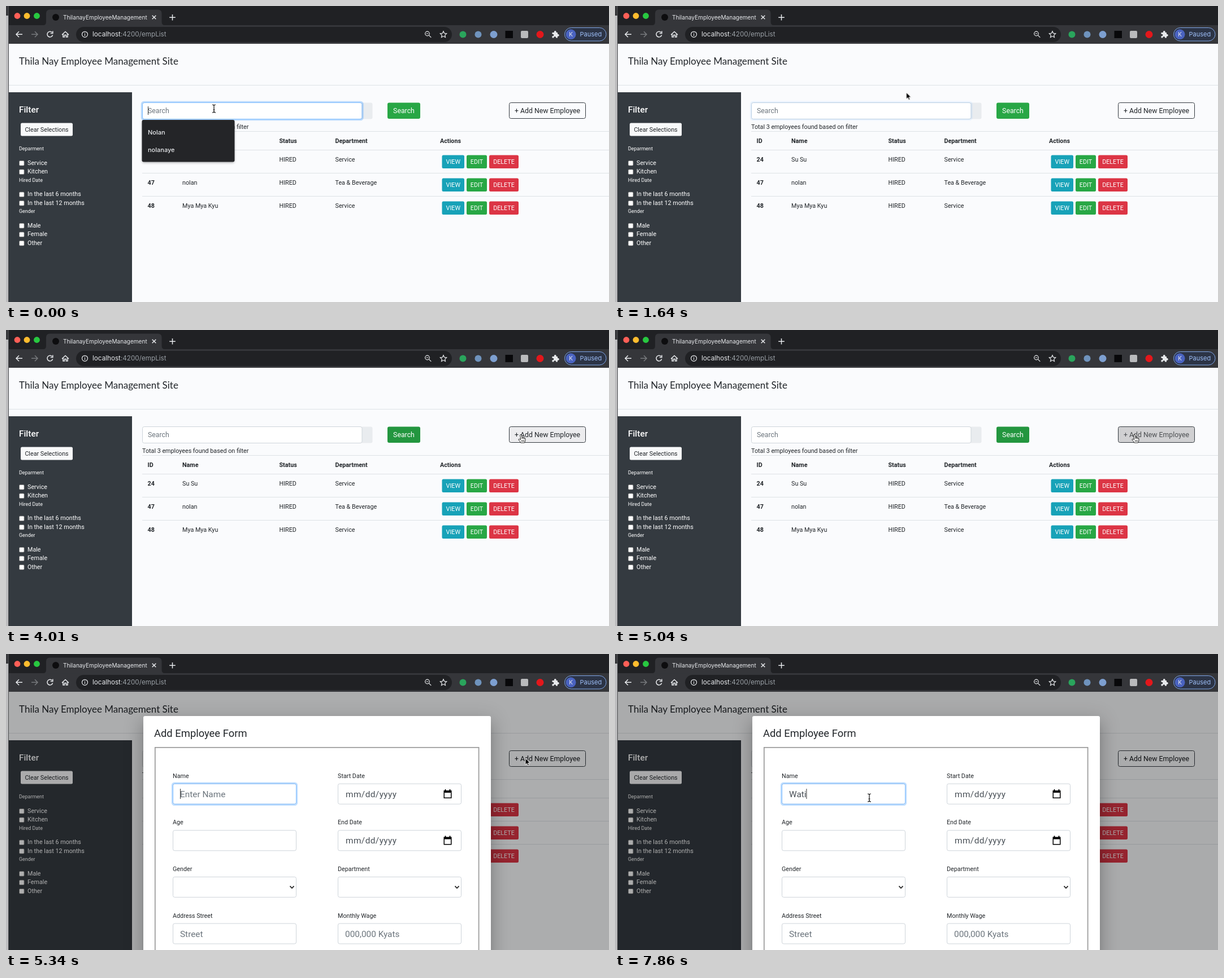
These frames come from a looping animation (1067 by 525 pixels, 8 s). An HTML page:

```html
<!DOCTYPE html>
<html lang="en">
<head>
<meta charset="utf-8">
<title>Employee list</title>
<style>
html, body { margin: 0; width: 100%; height: 100%; overflow: hidden; background: #fafbfd; }
svg { display: block; width: 1067px; height: 525px; }
text { font: 10.75px Roboto, sans-serif; fill: #212529; white-space: pre; }
.base { font-size: 12.3px; }
.big { font-size: 15.36px; }
.title { font-size: 18.4px; }
.bold { font-weight: 700; }
.hint { fill: #6c757d; }
.mid { text-anchor: middle; }
.white { fill: #fff; }
.tiny { font-size: 8.95px; }
.brand { font: 17px Lato, sans-serif; }
.ui { font: 11px Inter, sans-serif; fill: #e8eaed; }
.item { font-weight: 500; }
.line { fill: none; stroke: #e8eaed; stroke-width: 1.5; }
.box { fill: #fff; stroke: #ced4da; }
.ring { fill: none; stroke: #007bff; stroke-opacity: .25; stroke-width: 2.4; }
.edge { fill: none; stroke: #80bdff; }
.rule { stroke: #dee2e6; }
.cell { fill: none; stroke: #999; stroke-width: 1.7; }
.shadow1 { filter: blur(6px); opacity: .2; }
.shadow2 { filter: blur(14px); opacity: .14; }
.shadow3 { filter: blur(17px); opacity: .12; }

.anim, .anim * { animation: 8s step-end infinite; }
#cursor { animation-name: move; }
#beam { animation-name: beam; }
#arrow { animation-name: arrow; }
#hand { animation-name: hand; }
#searchFocus { animation-name: searchFocus; }
#searchCaret { animation-name: searchCaret; }
#history { animation-name: history; }
#searchBtn { animation-name: searchBtn; }
#addBtn { animation-name: addBtn; }
#addText { animation-name: addText; }
#backdrop { animation-name: backdrop; }
#modal { animation-name: modal; transform-origin: 550.5px 345px; }
#nameFocus { animation-name: nameFocus; }
#nameCaret { animation-name: nameCaret; }
#nameHint { animation-name: nameHint; }
#autofill { animation-name: autofill; }
#typed tspan { visibility: hidden; }
#typed tspan:nth-child(1) { animation-name: key1; }
#typed tspan:nth-child(2) { animation-name: key2; }
#typed tspan:nth-child(3) { animation-name: key3; }
#typed tspan:nth-child(4) { animation-name: key4; }

@keyframes move {
  0% { transform: translate(368px, 182px); }
  1.875% { transform: translate(371px, 184px); }
  3.75% { transform: translate(375px, 188px); }
  5.625% { transform: translate(378px, 190px); }
  9.375% { transform: translate(390px, 189px); }
  11.25% { transform: translate(414px, 184px); }
  13.125% { transform: translate(445px, 176px); }
  14.875% { transform: translate(475px, 167px); }
  16.75% { transform: translate(500px, 158px); }
  18.625% { transform: translate(513px, 154px); }
  20.5% { transform: translate(515.5px, 153.5px); }
  24.25% { transform: translate(681px, 162px); }
  28% { transform: translate(688px, 178px); }
  29.875% { transform: translate(690px, 185px); }
  31.75% { transform: translate(690px, 188px); }
  39.125% { transform: translate(702px, 189px); }
  41% { transform: translate(736px, 191px); }
  42.875% { transform: translate(780px, 191px); }
  44.625% { transform: translate(825px, 190px); }
  46.5% { transform: translate(865px, 188px); }
  48.375% { transform: translate(896px, 187px); }
  50.125% { transform: translate(911px, 185px); }
  53.75% { transform: translate(915px, 185px); }
  55.625% { transform: translate(919px, 185px); }
  68.625% { transform: translate(880px, 192px); }
  70.5% { transform: translate(720px, 212px); }
  72.375% { transform: translate(548px, 242px); }
  74.25% { transform: translate(450px, 255px); }
}
@keyframes beam { 0% { opacity: 1; } 14.875% { opacity: 0; } 74.25% { opacity: 1; } }
@keyframes arrow {
  0% { opacity: 0; } 14.875% { opacity: 1; } 28% { opacity: 0; } 41% { opacity: 1; }
  48.375% { opacity: 0; } 63.125% { opacity: 1; } 74.25% { opacity: 0; }
}
@keyframes hand {
  0% { opacity: 0; } 28% { opacity: 1; } 41% { opacity: 0; }
  48.375% { opacity: 1; } 63.125% { opacity: 0; }
}
@keyframes searchFocus { 0% { opacity: 1; } 18.625% { opacity: .7; } 20.5% { opacity: .25; } 22.375% { opacity: 0; } }
@keyframes searchCaret { 0% { opacity: 1; } 3.75% { opacity: 0; } 11.25% { opacity: 1; } 16.75% { opacity: 0; } }
@keyframes history { 0% { opacity: 1; } 18.625% { opacity: 0; } }
@keyframes searchBtn {
  0% { fill: #28a745; } 28% { fill: #249540; } 29.875% { fill: #218838; }
  31.75% { fill: #1e7e34; } 33.5% { fill: #218838; } 41% { fill: #23963f; }
}
@keyframes addBtn {
  0% { fill: #fafbfd; } 48.375% { fill: #f2f2f4; } 50.125% { fill: #ececee; }
  61.25% { fill: #d0d0d2; } 66.75% { fill: #fafbfd; }
}
@keyframes addText { 0% { fill: #212529; } 61.25% { fill: #4c4f52; } 66.75% { fill: #16191c; } }
@keyframes backdrop { 0% { opacity: 0; } 63.125% { opacity: .04; } 64.875% { opacity: .21; } 66.75% { opacity: .315; } 68.625% { opacity: .32; } }
@keyframes modal {
  0% { opacity: 0; transform: scale(.7); }
  64.875% { opacity: .98; transform: scale(.99); }
  66.75% { opacity: 1; transform: none; }
}
@keyframes nameFocus { 0% { opacity: 0; } 66.75% { opacity: 1; } }
@keyframes nameCaret {
  0% { opacity: 0; transform: none; }
  66.75% { opacity: 1; transform: none; }
  72.375% { opacity: 0; transform: none; }
  77.875% { opacity: 1; transform: none; }
  83.375% { opacity: 0; transform: none; }
  89% { opacity: 1; transform: translate(13.5px, 0); }
  90.875% { opacity: 1; transform: translate(21.7px, 0); }
  94.625% { opacity: 1; transform: translate(26.7px, 0); }
  98.25% { opacity: 1; transform: translate(30.4px, 0); }
}
@keyframes nameHint { 0% { opacity: 1; } 89% { opacity: 0; } }
@keyframes autofill { 0% { opacity: 0; } 79.75% { opacity: 1; } 89% { opacity: 0; } }
@keyframes key1 { 0% { visibility: hidden; } 89% { visibility: visible; } }
@keyframes key2 { 0% { visibility: hidden; } 90.875% { visibility: visible; } }
@keyframes key3 { 0% { visibility: hidden; } 94.625% { visibility: visible; } }
@keyframes key4 { 0% { visibility: hidden; } 98.25% { visibility: visible; } }
</style>
</head>
<body>
<svg viewBox="0 0 1067 525" class="anim">
  <rect width="1067" height="525" fill="#fafbfd"/>

  <!-- page -->
  <text class="brand" x="23" y="103.5">Thila Nay Employee Management Site</text>
  <path class="rule" d="M5 140.5H1067"/>
  <rect x="5" y="153" width="218" height="372" fill="#343a40"/>
  <text class="big white" x="23" y="188.6" font-weight="500" style="font-weight:500">Filter</text>
  <rect x="26" y="207.5" width="92" height="23" rx="2.5" fill="#f8f9fa"/>
  <text class="mid" x="72" y="222.9">Clear Selections</text>
  <g id="filters"></g>

  <rect x="628" y="171.5" width="20.5" height="29" rx="3" fill="#e9ecef"/>
  <rect class="box" x="241.5" y="171.5" width="388.5" height="29" rx="3"/>
  <g id="searchFocus">
    <rect class="ring" x="240" y="170" width="391.5" height="32" rx="4"/>
    <rect class="edge" x="241.5" y="171.5" width="388.5" height="29" rx="3"/>
  </g>
  <text class="base hint" x="251" y="189.6">Search</text>
  <path id="searchCaret" d="M251.5 178V193" stroke="#333"/>
  <rect id="searchBtn" x="675" y="171.5" width="58" height="28.5" rx="3"/>
  <text class="base mid white" x="704" y="189.6">Search</text>
  <rect id="addBtn" x="890.5" y="171.5" width="135" height="28" rx="3" stroke="#343a40"/>
  <text id="addText" class="base mid" x="958" y="189.6">+ Add New Employee</text>
  <text x="241" y="217.8">Total 3 employees found based on filter</text>
  <g id="table"></g>

  <g id="history">
    <rect x="241" y="205" width="163" height="73" rx="3" style="filter:blur(2px)" opacity=".3"/>
    <rect x="240.5" y="202" width="164" height="74.5" rx="3" fill="#242528"/>
    <text class="ui item" x="251" y="228">Nolan</text>
    <text class="ui item" x="251" y="258.5">nolanaye</text>
  </g>

  <!-- dialog -->
  <rect id="backdrop" x="5" y="67" width="1062" height="458"/>
  <g id="modal">
    <rect class="shadow1" x="248" y="124" width="605" height="460"/>
    <rect class="shadow2" x="241" y="126" width="619" height="475"/>
    <rect class="shadow3" x="237" y="111" width="627" height="482"/>
    <rect x="243" y="110" width="615" height="470" rx="3" fill="#fff"/>
    <text class="title" x="262" y="147">Add Employee Form</text>
    <rect class="cell" x="263.8" y="165.8" width="572.8" height="400"/>
    <g id="fields"></g>
    <g id="nameFocus">
      <rect class="ring" x="294" y="228.7" width="221" height="39" rx="4"/>
      <rect class="edge" x="295.5" y="230.2" width="218" height="36" rx="3"/>
    </g>
    <text id="nameHint" class="big hint" x="308" y="253.6">Enter Name</text>
    <text id="typed" class="big" x="308" y="253.6" style="fill:#495057"><tspan>W</tspan><tspan>a</tspan><tspan>t</tspan><tspan>i</tspan></text>
    <path id="nameCaret" d="M308.5 239V257" stroke="#333"/>
    <g id="autofill">
      <rect x="295" y="271" width="219" height="147" rx="3" style="filter:blur(2px)" opacity=".35"/>
      <rect x="294.5" y="268" width="219.5" height="148" rx="3" fill="#292a2d"/>
      <path d="M294.5 381.5H514" stroke="#3f4145"/>
      <text class="ui item" x="305" y="294.8">Khin Maw Aye</text>
      <text class="ui" x="305" y="312.6" style="font-size:10px">283 Doval St</text>
      <text class="ui item" x="305" y="343.9">Nolan Aye</text>
      <text class="ui" x="305" y="361.6" style="font-size:10px">2715 W Torv St</text>
      <text class="ui item" x="305" y="402.9" style="font-size:10.8px">Manage addresses...</text>
    </g>
  </g>

  <!-- browser window -->
  <rect width="4" height="525" fill="#bdbdbf"/>
  <rect width="4" height="17" fill="#3a3b3e"/>
  <path d="M4.5 0V525" stroke="#4b4c4f"/>
  <rect x="5" width="1062" height="35" fill="#202124"/>
  <rect x="5" y="34" width="1062" height="33" fill="#35363a"/>
  <circle cx="20" cy="17.5" r="5.4" fill="#ff5f57"/>
  <circle cx="37" cy="17.5" r="5.4" fill="#febc2e"/>
  <circle cx="54.5" cy="17.5" r="5.4" fill="#28c840"/>
  <path d="M65 34.5Q71 34.5 71 28V13Q71 6.5 77.500 6.5H269Q275.500 6.500 275.500 13V28Q275.500 34.500 282 34.500Z" fill="#35363a"/>
  <circle cx="88" cy="20" r="6" fill="#0d0d0f"/>
  <text class="ui" x="101" y="23.800" style="font-size:10.05px">ThilanayEmployeeManagement</text>
  <path class="line" d="M258.700 16.700l6.600 6.600m0-6.600l-6.600 6.600M294.500 15V25.500M289.200 20.200H299.800"/>
  <path class="line" d="M29 50.300H18.500M23 45.300l-5 5 5 5"/>
  <path class="line" style="stroke:#77797d" d="M45 50.300H55.500M51 45.300l5 5-5 5"/>
  <path class="line" d="M81.500 46.800A4.900 4.900 0 1 0 82.600 51.500M82.800 44.500V48.500H78.800"/>
  <path class="line" d="M99 51l6-5.500 6 5.500M101 49.500V55H103.500V51.500H106.500V55H109V49.500"/>
  <rect x="124" y="37" width="665" height="27" rx="13.500" fill="#202124"/>
  <g class="line" style="stroke-width:1.200">
    <circle cx="139.500" cy="50.300" r="5"/>
    <path d="M139.500 49.500V53M139.500 47.200V48.400"/>
    <circle cx="745.500" cy="49" r="3.800"/>
    <path d="M748.300 51.800l4 4M743.700 49H747.300"/>
    <path d="M774 44.700l1.700 3.700 4 .5-3 2.700.8 4-3.500-2-3.500 2 .8-4-3-2.700 4-.5z"/>
  </g>
  <text class="ui" x="153" y="54.400" style="font-size:11.700px">localhost<tspan fill="#9aa0a6">:4200/empList</tspan></text>
  <circle cx="808.500" cy="50.500" r="6" fill="#2aa55c"/>
  <circle cx="835.500" cy="50.500" r="6" fill="#6f93bd"/>
  <circle cx="863" cy="50.500" r="6.500" fill="#7d9fd0"/>
  <rect x="883.500" y="44" width="13.500" height="13" fill="#08080a"/>
  <rect x="911" y="44" width="13" height="13" rx="2" fill="#b9babc"/>
  <circle cx="945" cy="50.500" r="6.500" fill="#e3171b"/>
  <path d="M966.500 47H970A2 2 0 1 1 973.500 47H976V50A2 2 0 1 1 976 53.700V56.500H973A1.800 1.800 0 1 0 969.500 56.500H966.500V53A1.800 1.800 0 1 0 966.500 50Z" fill="#e8eaed"/>
  <rect x="988.500" y="38.500" width="73.500" height="23.500" rx="11.750" fill="#2c3446" stroke="#7fa6e8"/>
  <circle cx="999.500" cy="50.300" r="9" fill="#4a63c0"/>
  <text class="ui mid" x="999.500" y="54" style="font-size:10px">K</text>
  <text class="ui" x="1015.500" y="54.300" style="fill:#9fc0fa">Paused</text>

  <g id="cursor">
    <path id="beam" d="M-3 -7Q0 -7 0 -5Q0 -7 3 -7M0 -5V5M-3 7Q0 7 0 5Q0 7 3 7M-1.500 2H1.500" fill="none" stroke="#111" stroke-width="1.200"/>
    <path id="arrow" d="M0 0V11.500L2.700 9 4.500 13.200 6.500 12.300 4.700 8.200H8.400Z" fill="#000" stroke="#fff" stroke-width=".9"/>
    <path id="hand" d="M-1.300 1Q0 -.5 1.200 1L2 5.300Q3.300 4.300 4 5.600 5.400 5 6 6.400 7.800 6 7.900 7.800V11L6.500 15H-.2Q-1 12.500 -3.800 10.200-4.500 8.500-2.700 8.300L-.3 9.500Z M2 5.300V8M4 5.600V8.300M6 6.400V8.600M1.500 10.500V13M3.500 10.500V13M5.300 10.500V13" fill="#fff" stroke="#111" stroke-width=".9"/>
  </g>
</svg>

<script>
const put = (id, html) => document.getElementById(id).innerHTML = html;
const text = (x, y, label, cls = '') => `<text x="${x}" y="${y}" class="${cls}">${label}</text>`;

const heads = [['Deparment', 256.2], ['Hired Date', 311.7], ['Gender', 367.2]];
const checks = [['Service', 278], ['Kitchen', 293.5], ['In the last 6 months', 333.5],
  ['In the last 12 months', 349], ['Male', 389], ['Female', 404.5], ['Other', 420]];
put('filters',
  heads.map(([label, y]) => text(23, y, label, 'tiny white')).join('') +
  checks.map(([label, y]) =>
    `<rect x="23.5" y="${y - 3.5}" width="8.6" height="8.6" rx="1.5" fill="#fff" stroke="#767676" stroke-width=".8"/>` +
    text(38, y + 3.9, label, 'white')).join(''));

const columns = [250.5, 312, 483.5, 582.5, 768];
const people = [['24', 'Su Su', 'HIRED', 'Service'], ['47', 'nolan', 'HIRED', 'Tea &amp; Beverage'],
  ['48', 'Mya Mya Kyu', 'HIRED', 'Service']];
const actions = [['VIEW', 771.5, 39.5, '#17a2b8'], ['EDIT', 815, 36, '#28a745'], ['DELETE', 855, 52, '#dc3545']];
const button = (y, [label, x, w, color]) =>
  `<rect x="${x}" y="${y}" width="${w}" height="23.5" rx="2.5" fill="${color}"/>` +
  text(x + w / 2, y + 15.6, label, 'mid white');
put('table',
  '<path class="rule" d="M241 222.5H1067M241 255.5H1067M241 296.500H1067M241 337.500H1067"/>' +
  ['ID', 'Name', 'Status', 'Department', 'Actions'].map((h, i) => text(columns[i], 242.8, h, 'bold')).join('') +
  people.map((row, r) =>
    row.map((v, i) => text(columns[i], 275.9 + 41 * r, v, i ? '' : 'bold')).join('') +
    actions.map(a => button(264.5 + 41 * r, a)).join('')).join(''));

const calendar = y => `<path transform="translate(781.5 ${y})" fill-rule="evenodd"
  d="M-7 -6H-5V-8H-3V-6H3V-8H5V-6H7V8H-7ZM-5.500 -2V6.500H5.500V-2Z"/>`;
const chevron = (x, y) => `<path d="M${x - 3.500} ${y - 2}l3.500 3.700 3.500-3.700" fill="none" stroke="#222" stroke-width="1.700"/>`;
const form = [
  ['Name', '', 'Start Date', 'date'], ['Age', '', 'End Date', 'date'],
  ['Gender', 'select', 'Department', 'select'], ['Address Street', 'Street', 'Monthly Wage', '000,000 Kyats']];
const field = (x, row, label, kind) => {
  const y = 230.2 + 82.6 * row, mid = y + 18.2;
  const body = kind === 'date'
    ? `<text x="${x + 14}" y="${mid + 5.400}" class="big" style="fill:#495057;letter-spacing:.45px">mm/dd/yyyy</text>` + calendar(mid - .4)
    : kind === 'select' ? chevron(x + 211, mid) : text(x + 13, mid + 5.400, kind, 'big hint');
  return text(x, y - 10.500, label) +
    `<rect class="box" x="${x + .5}" y="${y}" width="218" height="36" rx="3"/>` + body;
};
put('fields', form.map(([a, aKind, b, bKind], row) =>
  field(295, row, a, aKind) + field(587, row, b, bKind)).join(''));
</script>
</body>
</html>
```
